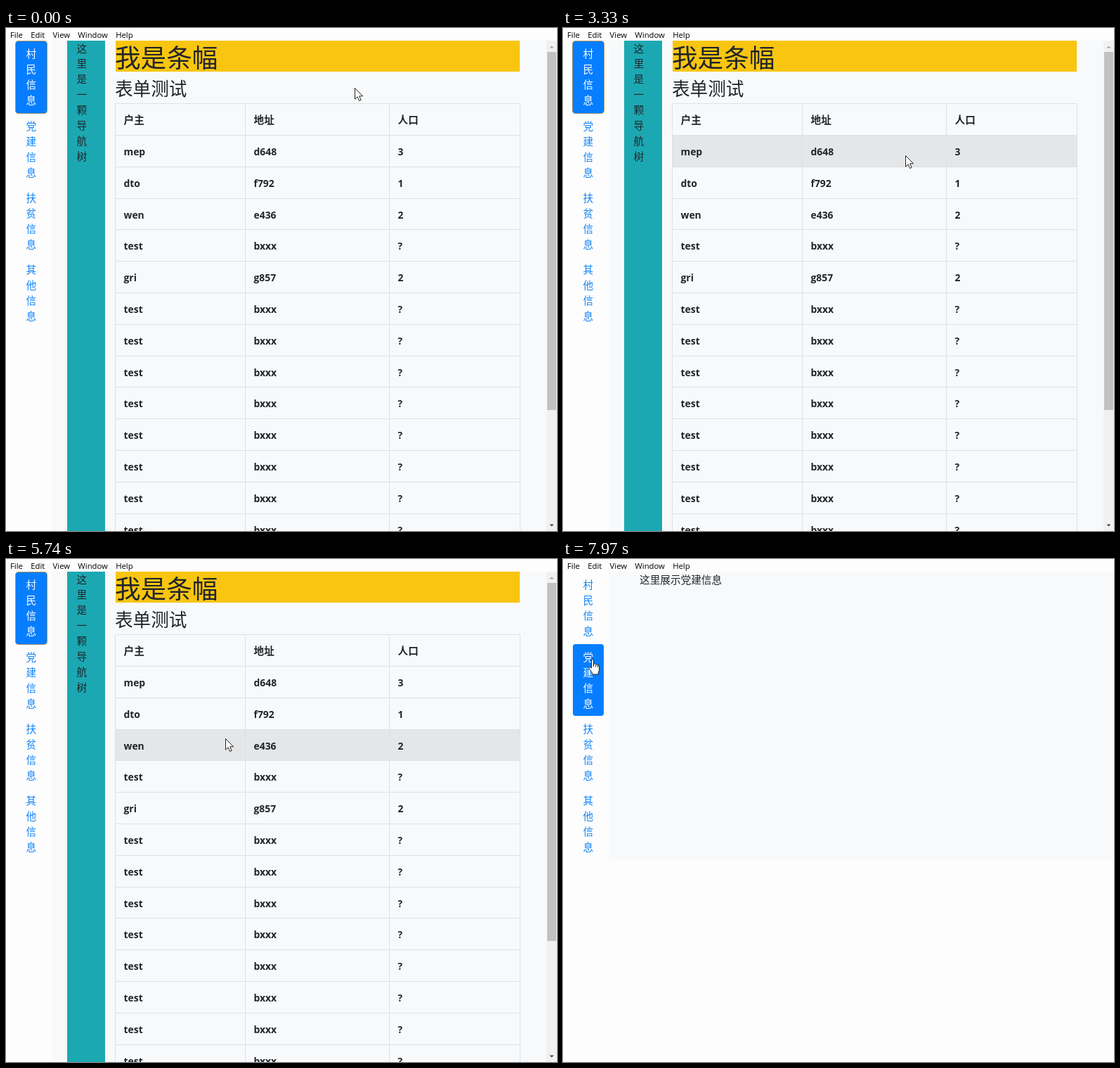
Write an HTML page that moves like this. It is 784 px wide and 715 px high and loops after 8 s.

```html
<!DOCTYPE html>
<html lang="zh-CN">
<head>
<meta charset="utf-8">
<title>表单测试</title>
<style>
  html, body { margin: 0; width: 100%; height: 100%; overflow: hidden; background: #fdfdfd; }
  #stage {
    position: relative; width: 784px; height: 715px; overflow: hidden;
    font: 14.63px/21.94px "Open Sans", "Noto Sans CJK SC", "Noto Sans CJK", sans-serif;
    color: #212529; background: #fdfdfd; white-space: nowrap;
  }
  #stage * { box-sizing: border-box; }
  #stage > *, #villagers > *, .bar > * { position: absolute; }
  .menu { left: 6px; display: flex; gap: 11.3px; font-size: 11.3px; line-height: 19px; color: #000; }
  .panel { left: 65px; right: 0; top: 18px; background: #f8f9fa; }
  .nav { left: 14px; top: 18.5px; width: 43.5px; }
  .link {
    height: 102.4px; padding: 7.8px 14.4px; border-radius: 3.7px;
    color: #1585f7; white-space: normal; word-break: break-all;
  }
  .link.over { color: #0056b3; }
  .link.active { color: #fff; background: #067eff; }
  .link.focus { box-shadow: 0 0 0 1px #a89668; }
  .tree {
    left: 87px; top: 18px; width: 54px; height: 697px; padding: .5px 13.5px;
    background: #1ca8b2; white-space: normal; word-break: break-all;
  }
  .banner {
    left: 156px; top: 18px; width: 575px; height: 44px; padding-top: 2px;
    background: #f8c510; font-size: 36.6px; line-height: 44px; text-indent: -1px;
  }
  .title { left: 155px; top: 71px; font-size: 25.6px; line-height: 31px; }
  .row {
    left: 155px; width: 577px; display: grid; grid-template-columns: 184px 205px 1fr;
    border: 1px solid #dee2e6; border-top-width: 0; font-weight: 700; line-height: 45px;
  }
  .row.head { border-top-width: 1px; }
  .row.data { font-size: 13.9px; }
  .row.over { background: #e5e6e7; }
  .row div { padding-left: 11.5px; overflow: hidden; }
  .row div + div { border-left: 1px solid #dee2e6; }
  .party { left: 109px; top: 18.8px; }
  .bar { right: 0; top: 18px; width: 15px; height: 697px; background: #f1f1f1; }
  .thumb { left: 1px; top: 16px; width: 13px; height: 509px; background: #c1c1c1; }
  #pointer { left: 0; top: 0; overflow: visible; }
</style>
</head>
<body>
<div id="stage">
  <div class="panel" id="panel"></div>
  <div class="menu"><span>File</span><span>Edit</span><span>View</span><span>Window</span><span>Help</span></div>
  <div class="nav" id="nav"></div>
  <div id="villagers">
    <div class="tree">这里是一颗导航树</div>
    <div class="banner">我是条幅</div>
    <div class="title">表单测试</div>
  </div>
  <div class="party" id="party">这里展示党建信息</div>
  <div class="bar" id="bar">
    <div class="thumb"></div>
    <svg width="15" height="697">
      <path d="M4.5 10.5L7.5 7.5L10.5 10.5Z" fill="#a3a3a3"/>
      <path d="M4.5 687.5L7.5 690.5L10.5 687.5Z" fill="#404040"/>
    </svg>
  </div>
  <svg id="pointer" width="24" height="26" fill="#fff" stroke="#222" stroke-linejoin="round">
    <path id="arrow" d="M.5.5V16.2L4.1 12.8L6.6 18.5L9.1 17.4L6.7 11.8H11.6Z"/>
    <g id="hand">
      <path d="M-1.5 1Q-1.5-.5 0-.5Q1.5-.5 1.5 1V6.5Q3.8 5 4.6 7Q6.8 6 7.4 8Q9.6 7.5 9.6 10V14Q9.6 16 8.2 18V21H-.6V18.5L-4.6 13Q-5.3 11.5-4.2 10.7Q-3 10-1.5 12Z"/>
      <path d="M1.5 6.5V10M4.6 7.5V10.5M7.4 8.5V11" fill="none"/>
    </g>
  </svg>
</div>
<script>
const LOOP = 8000, SWITCH = 7700, HOVER_LAG = 40;
const HEAD_TOP = 107, ROWS_TOP = 153, ROW_STEP = 44.8, ROW_COUNT = 13;
const NAV_TOP = 18.5, NAV_STEP = 102.4;
const $ = id => document.getElementById(id);

// Pointer strokes; it rests between them
const home = { x: 496, y: 85 };
const moves = [
  { from: 30, to: 1060, x: 163, y: 102 },
  { from: 1360, to: 1430, x: 335, y: 129 },
  { from: 2470, to: 3230, x: 487, y: 181 },
  { from: 3470, to: 3830, x: 440, y: 430 },
  { from: 3830, to: 4230, x: 351, y: 281 },
  { from: 4530, to: 5300, x: 416, y: 310 },
  { from: 5340, to: 6240, x: 182, y: 186 },
  { from: 6400, to: 6470, x: 187, y: 175 },
  { from: 6640, to: 6940, x: 60, y: 135 },
  { from: 6940, to: 7440, x: 42, y: 143 }
];

function add(parent, cls, text = '') {
  const el = document.createElement('div');
  el.className = cls;
  el.textContent = text;
  parent.append(el);
  return el;
}

function addRow(cells, top, bottom, cls) {
  const row = add($('villagers'), 'row ' + cls);
  row.style.top = top + 'px';
  row.style.height = bottom - top + 'px';
  cells.forEach(text => add(row, '', text));
  return row;
}

const links = ['村民信息', '党建信息', '扶贫信息', '其他信息'].map(text => add($('nav'), 'link', text));

const blank = ['test', 'bxxx', '?'];
const homes = [['mep', 'd648', '3'], ['dto', 'f792', '1'], ['wen', 'e436', '2'], blank, ['gri', 'g857', '2']];
const rowTop = i => Math.round(ROWS_TOP + i * ROW_STEP);
addRow(['户主', '地址', '人口'], HEAD_TOP, ROWS_TOP, 'head');
const rows = Array.from({ length: ROW_COUNT }, (_, i) =>
  addRow(homes[i] || blank, rowTop(i), rowTop(i + 1), 'data'));

function pointerAt(t) {
  let { x, y } = home;
  for (const m of moves) {
    const k = Math.min(1, Math.max(0, (t - m.from) / (m.to - m.from)));
    x += (m.x - x) * k;
    y += (m.y - y) * k;
  }
  return { x, y };
}

function draw(t) {
  const now = pointerAt(t), late = pointerAt(t - HOVER_LAG);
  const switched = t >= SWITCH;
  const overRow = late.x > 155 && late.x < 732 ? Math.floor((late.y - ROWS_TOP) / ROW_STEP) : -1;
  const overLink = now.x > 14 && now.x < 57.5 ? Math.floor((now.y - NAV_TOP) / NAV_STEP) : -1;
  const onLink = overLink in links;

  rows.forEach((row, i) => row.classList.toggle('over', i === overRow));
  links.forEach((link, i) => {
    link.classList.toggle('active', i === Number(switched));
    link.classList.toggle('focus', i === 0 && !switched);
    link.classList.toggle('over', i === overLink);
  });
  $('villagers').style.display = $('bar').style.display = switched ? 'none' : 'block';
  $('party').style.display = switched ? 'block' : 'none';
  $('panel').style.height = (switched ? 411 : 697) + 'px';
  $('arrow').style.display = onLink ? 'none' : 'inline';
  $('hand').style.display = onLink ? 'inline' : 'none';
  $('pointer').style.transform = `translate(${Math.round(now.x)}px, ${Math.round(now.y)}px)`;
}

const start = performance.now();
function tick() {
  draw((performance.now() - start) % LOOP);
  requestAnimationFrame(tick);
}
tick();
</script>
</body>
</html>
```
